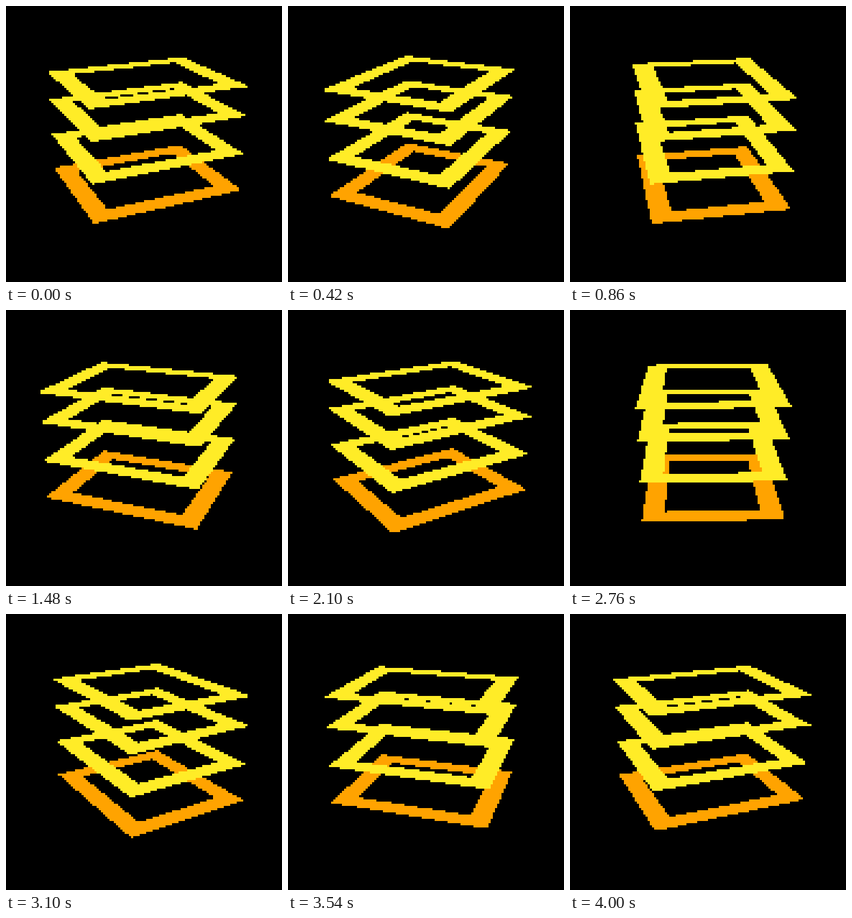
Write an HTML page with a canvas that moves like this. It is 512x512 px and loops after 4020 ms.

```html
<!DOCTYPE html>
<html lang="en">
<head>
<meta charset="utf-8">
<title>Turning frames</title>
<style>
  html, body { margin: 0; height: 100%; overflow: hidden; background: #000; }
  canvas { display: block; width: 100vw; height: 100vh; image-rendering: pixelated; }
</style>
</head>
<body>
<canvas id="stage" width="128" height="128"></canvas>
<script>
const ctx = document.getElementById('stage').getContext('2d');
const SIZE = 128, STEP = 20, STEPS = 201;

// Camera: focal length in pixels, distance in model units, downward pitch
const FOCAL = 245, DIST = 41.75, PITCH = Math.PI / 8;
const CX = 64.2, CY = 64.25;
const SIN = Math.sin(PITCH), COS = Math.cos(PITCH);

// The frames sit slightly off the turning axis
const START = 155.3 * Math.PI / 180;
const LONG = 6, SHORT = 5, BORDER = 1.42, OFFSET = 0.17;

// Bottom to top; positive heights lie below the centre
const LAYERS = [
  { y: 3.05, color: '#ffa300' },
  { y: 0, color: '#ffec27' },
  { y: -3.05, color: '#ffec27' },
  { y: -5.3, color: '#ffec27' }
];

function project(x, y, z) {
  const scale = FOCAL / (DIST + y * SIN - z * COS);
  return [CX + x * scale, CY + (y * COS + z * SIN) * scale];
}

function rectangle(a, b, y, angle) {
  const c = Math.cos(angle), s = Math.sin(angle);
  return [[a, b], [-a, b], [-a, -b], [a, -b]]
    .map(([u, v]) => [u, v + OFFSET])
    .map(([u, v]) => project(u * c - v * s, y, u * s + v * c));
}

function edges(points) {
  return points.map((p, i) => [p, points[(i + 1) % points.length]]);
}

// Even-odd scanline fill; every touched pixel of a span is included
function fill(lines, color) {
  ctx.fillStyle = color;
  for (let row = 0; row < SIZE; row++) {
    const y = row + 0.5;
    const hits = lines
      .filter(([p, q]) => (p[1] <= y) !== (q[1] <= y))
      .map(([p, q]) => p[0] + (y - p[1]) / (q[1] - p[1]) * (q[0] - p[0]))
      .sort((a, b) => a - b)
      .map(Math.floor);
    for (let i = 0; i + 1 < hits.length; i += 2) {
      ctx.fillRect(hits[i], row, hits[i + 1] - hits[i] + 1, 1);
    }
  }
}

function draw(step) {
  const angle = START - step / STEPS * 2 * Math.PI;
  ctx.fillStyle = '#000';
  ctx.fillRect(0, 0, SIZE, SIZE);
  for (const { y, color } of LAYERS) {
    const outer = rectangle(LONG, SHORT, y, angle);
    const inner = rectangle(LONG - BORDER, SHORT - BORDER, y, angle);
    fill([...edges(outer), ...edges(inner)], color);
  }
}

const begin = performance.now();

function tick() {
  draw(Math.floor((performance.now() - begin) / STEP) % STEPS);
  requestAnimationFrame(tick);
}

tick();
</script>
</body>
</html>
```
